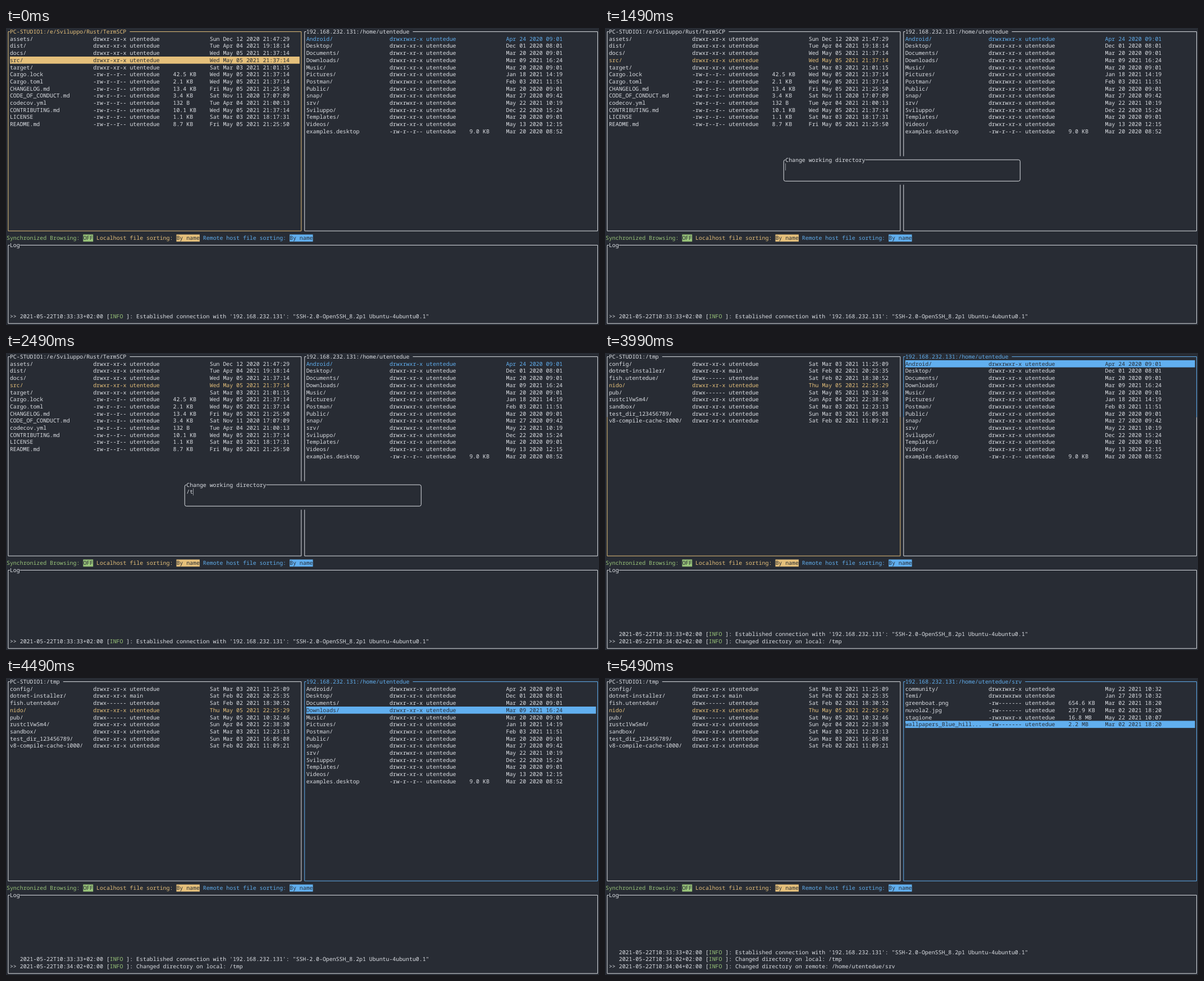
An HTML page for the animation above (7990 ms loop, 1056 px wide and 530 px high).

```html
<!DOCTYPE html>
<html lang="en">
<head>
<meta charset="utf-8">
<title>Terminal file transfer</title>
<style>
  html, body { margin: 0; width: 100%; height: 100%; overflow: hidden; background: #282c34; }
  svg { display: block; width: 1056px; height: 530px; }
  text {
    font: 9.883px "Noto Sans Mono", "DejaVu Sans Mono", monospace;
    white-space: pre;
    text-rendering: geometricPrecision;
  }
</style>
</head>
<body>
<svg id="stage" viewBox="0 0 1056 530"></svg>
<script>
const stage = document.getElementById('stage');
const BG = '#282c34', FG = '#dcdfe4', YELLOW = '#e5c07b', BLUE = '#61afef', GREEN = '#98c379';
const CELL_W = 5.93, CELL_H = 12.7, LOOP = 7990;
const USER = 'utentedue', HOST = 'PC-STUDIO1', IP = '192.168.232.131';
const DIR = 'drwxr-xr-x', SHARED = 'drwxrwxr-x', OPEN = 'drwxrwxrwx', PRIVATE = 'drwx------';
const FILE = '-rw-r--r--', SECRET = '-rw-------', EXEC = '-rwxrwxr-x';

const entry = (name, perms, date, size = '', owner = USER) => ({ name, perms, date, size, owner });

const project = [
  entry('assets/', DIR, 'Sun Dec 12 2020 21:47:29'),
  entry('dist/', DIR, 'Tue Apr 04 2021 19:18:14'),
  entry('docs/', DIR, 'Wed May 05 2021 21:37:14'),
  entry('src/', DIR, 'Wed May 05 2021 21:37:14'),
  entry('target/', DIR, 'Sat Mar 03 2021 21:01:15'),
  entry('Cargo.lock', FILE, 'Wed May 05 2021 21:37:14', '42.5 KB'),
  entry('Cargo.toml', FILE, 'Wed May 05 2021 21:37:14', '2.1 KB'),
  entry('CHANGELOG.md', FILE, 'Fri May 05 2021 21:25:50', '13.4 KB'),
  entry('CODE_OF_CONDUCT.md', FILE, 'Sat Nov 11 2020 17:07:09', '3.4 KB'),
  entry('codecov.yml', FILE, 'Tue Apr 04 2021 21:00:13', '132 B'),
  entry('CONTRIBUTING.md', FILE, 'Wed May 05 2021 21:37:14', '10.1 KB'),
  entry('LICENSE', FILE, 'Sat Mar 03 2021 18:17:31', '1.1 KB'),
  entry('README.md', FILE, 'Fri May 05 2021 21:25:50', '8.7 KB')
];
const temp = [
  entry('config/', DIR, 'Sat Mar 03 2021 11:25:09'),
  entry('dotnet-installer/', DIR, 'Sat Feb 02 2021 20:25:35', '', 'main'),
  entry(`fish.${USER}/`, PRIVATE, 'Sat Feb 02 2021 18:30:52'),
  entry('nido/', DIR, 'Thu May 05 2021 22:25:29'),
  entry('pub/', PRIVATE, 'Sat May 05 2021 10:32:46'),
  entry('rustc1VwSm4/', DIR, 'Sun Apr 04 2021 22:38:30'),
  entry('sandbox/', DIR, 'Sat Mar 03 2021 12:23:13'),
  entry('test_dir_123456789/', DIR, 'Sun Mar 03 2021 16:05:08'),
  entry('v8-compile-cache-1000/', DIR, 'Sat Feb 02 2021 11:09:21')
];
const home = [
  entry('Android/', SHARED, 'Apr 24 2020 09:01'),
  entry('Desktop/', DIR, 'Dec 01 2020 08:01'),
  entry('Documents/', DIR, 'Mar 20 2020 09:01'),
  entry('Downloads/', DIR, 'Mar 09 2021 16:24'),
  entry('Music/', DIR, 'Mar 20 2020 09:01'),
  entry('Pictures/', DIR, 'Jan 18 2021 14:19'),
  entry('Postman/', SHARED, 'Feb 03 2021 11:51'),
  entry('Public/', DIR, 'Mar 20 2020 09:01'),
  entry('snap/', DIR, 'Mar 27 2020 09:42'),
  entry('srv/', SHARED, 'May 22 2021 10:19'),
  entry('Sviluppo/', DIR, 'Dec 22 2020 15:24'),
  entry('Templates/', DIR, 'Mar 20 2020 09:01'),
  entry('Videos/', DIR, 'May 13 2020 12:15'),
  entry('examples.desktop', FILE, 'Mar 20 2020 08:52', '9.0 KB')
];
const served = [
  entry('community/', SHARED, 'May 22 2021 10:32'),
  entry('Temi/', OPEN, 'Jan 27 2019 10:32'),
  entry('greenboat.png', SECRET, 'Mar 02 2021 18:20', '654.6 KB'),
  entry('nuvola2.jpg', SECRET, 'Mar 02 2021 18:20', '237.9 KB'),
  entry('stagione', EXEC, 'May 22 2021 10:07', '16.8 MB'),
  entry('wallpapers_Blue_hill...', SECRET, 'Mar 02 2021 18:20', '2.2 MB')
];

const messages = [
  ['10:33:33', `Established connection with '${IP}': "SSH-2.0-OpenSSH_8.2p1 Ubuntu-4ubuntu0.1"`],
  ['10:34:02', 'Changed directory on local: /tmp'],
  ['10:34:04', `Changed directory on remote: /home/${USER}/srv`]
];

const localProject = { title: `${HOST}:/e/Sviluppo/Rust/TermSCP `, files: project };
const localTemp = { title: `${HOST}:/tmp `, files: temp };
const remoteHome = { title: `${IP}:/home/${USER} `, files: home };
const remoteServed = { title: `${IP}:/home/${USER}/srv `, files: served };

// Each scene keeps the settings of the one before unless it changes them.
const scenes = [];
[
  { at: 0, local: localProject, remote: remoteHome, focus: 'local', picked: 0, logged: 1 },
  { at: 1490, focus: 'popup', input: '' },
  { at: 2490, input: '/t' },
  { at: 2990, local: localTemp, focus: 'local', logged: 2 },
  { at: 3990, focus: 'remote', halfDrawn: true },
  { at: 4490, picked: 3, halfDrawn: false },
  { at: 4990, picked: 8 },
  { at: 5490, remote: remoteServed, picked: 5, logged: 3 }
].forEach((change, i) => scenes.push({ ...scenes[i - 1], ...change }));

const x = col => 1 + col * CELL_W;
const y = row => .2 + row * CELL_H;
const escapeText = s => s.replace(/&/g, '&amp;').replace(/</g, '&lt;').replace(/>/g, '&gt;');

const span = (s, color) => `<tspan fill="${color}">${escapeText(s)}</tspan>`;
const line = (col, row, content) => `<text x="${x(col)}" y="${y(row) + 9.8}">${content}</text>`;
const label = (col, row, s, color = FG) => s ? line(col, row, span(s, color)) : '';
const block = (col, row, cols, rows, color) =>
  `<rect x="${x(col)}" y="${y(row)}" width="${cols * CELL_W}" height="${rows * CELL_H}" fill="${color}"/>`;

function box(col, row, lastCol, lastRow, title, color = FG, radius = 0) {
  const left = x(col + .5), right = x(lastCol + .5), top = y(row + .5), bottom = y(lastRow + .5);
  const arc = (dx, dy) => radius ? `a${radius} ${radius} 0 0 1 ${dx * radius} ${dy * radius}` : '';
  const d = `M${x(col + 1 + title.length)} ${top}H${right - radius}${arc(1, 1)}V${bottom - radius}${arc(-1, 1)}` +
    `H${left + radius}${arc(-1, -1)}V${top + radius}${arc(1, -1)}H${x(col + 1)}`;
  return `<path d="${d}" fill="none" stroke="${color}"/>` + label(col + 1, row, title, color);
}

function listing(col, files, picked, accent, focused) {
  return files.map((f, i) => {
    const row = i + 1, chosen = i === picked;
    const color = !chosen ? FG : focused ? BG : accent;
    const fields = [[0, f.name], [25, f.perms], [36, f.owner], [49, f.size], [60, f.date]];
    return (chosen && focused ? block(col, row, 87, 1, accent) : '') +
      fields.map(([offset, s]) => label(col + offset, row, s, color)).join('');
  }).join('');
}

const panels = (scene, focus) =>
  box(0, 0, 88, 28, scene.local.title, focus === 'local' ? YELLOW : FG) +
  box(89, 0, 177, 28, scene.remote.title, focus === 'remote' ? BLUE : FG);

const clipped = (id, content) => `<g clip-path="url(#${id})">${content}</g>`;

function borders(scene) {
  if (!scene.halfDrawn) return panels(scene, scene.focus);
  return clipped('drawn', panels(scene, 'remote')) + clipped('pending', panels(scene, 'local'));
}

function status() {
  let col = 0;
  return [
    ['Synchronized Browsing: ', 'OFF', GREEN],
    ['Localhost file sorting: ', 'By name', YELLOW],
    ['Remote host file sorting: ', 'By name', BLUE]
  ].map(([name, value, color]) => {
    const valueCol = col + name.length;
    const part = label(col, 29, name, color) + block(valueCol, 29, value.length, 1, color) +
      label(valueCol, 29, value, BG);
    col = valueCol + value.length + 1;
    return part;
  }).join('');
}

function log(count) {
  return box(0, 30, 177, 41, 'Log') + messages.slice(0, count).map(([time, message], i) => {
    const row = 41 - count + i;
    return (i === count - 1 ? label(1, row, '>>') : '') +
      line(4, row, span(`2021-05-22T${time}+02:00 [`, FG) + span('INFO ', GREEN) + span(`]: ${message}`, FG));
  }).join('');
}

function popup(input) {
  return block(53, 18, 72, 4, BG) + box(53, 18, 124, 21, 'Change working directory', FG, 3) +
    label(54, 19, input) + block(54 + input.length, 19, .1, 1, FG);
}

function draw(scene) {
  const split = y(9);
  stage.innerHTML =
    `<defs><clipPath id="drawn"><rect width="1056" height="${split}"/></clipPath>` +
    `<clipPath id="pending"><rect y="${split}" width="1056" height="${530 - split}"/></clipPath></defs>` +
    `<rect width="1056" height="530" fill="${BG}"/>` +
    borders(scene) +
    listing(1, scene.local.files, 3, YELLOW, scene.focus === 'local') +
    listing(90, scene.remote.files, scene.picked, BLUE, scene.focus === 'remote') +
    status() + log(scene.logged) +
    (scene.focus === 'popup' ? popup(scene.input) : '');
}

let shown;
function render(time) {
  const scene = scenes.filter(s => s.at <= time).pop();
  if (scene !== shown) draw(shown = scene);
}

render(0);
const start = performance.now();
requestAnimationFrame(function tick() {
  render((performance.now() - start) % LOOP);
  requestAnimationFrame(tick);
});
</script>
</body>
</html>
```
